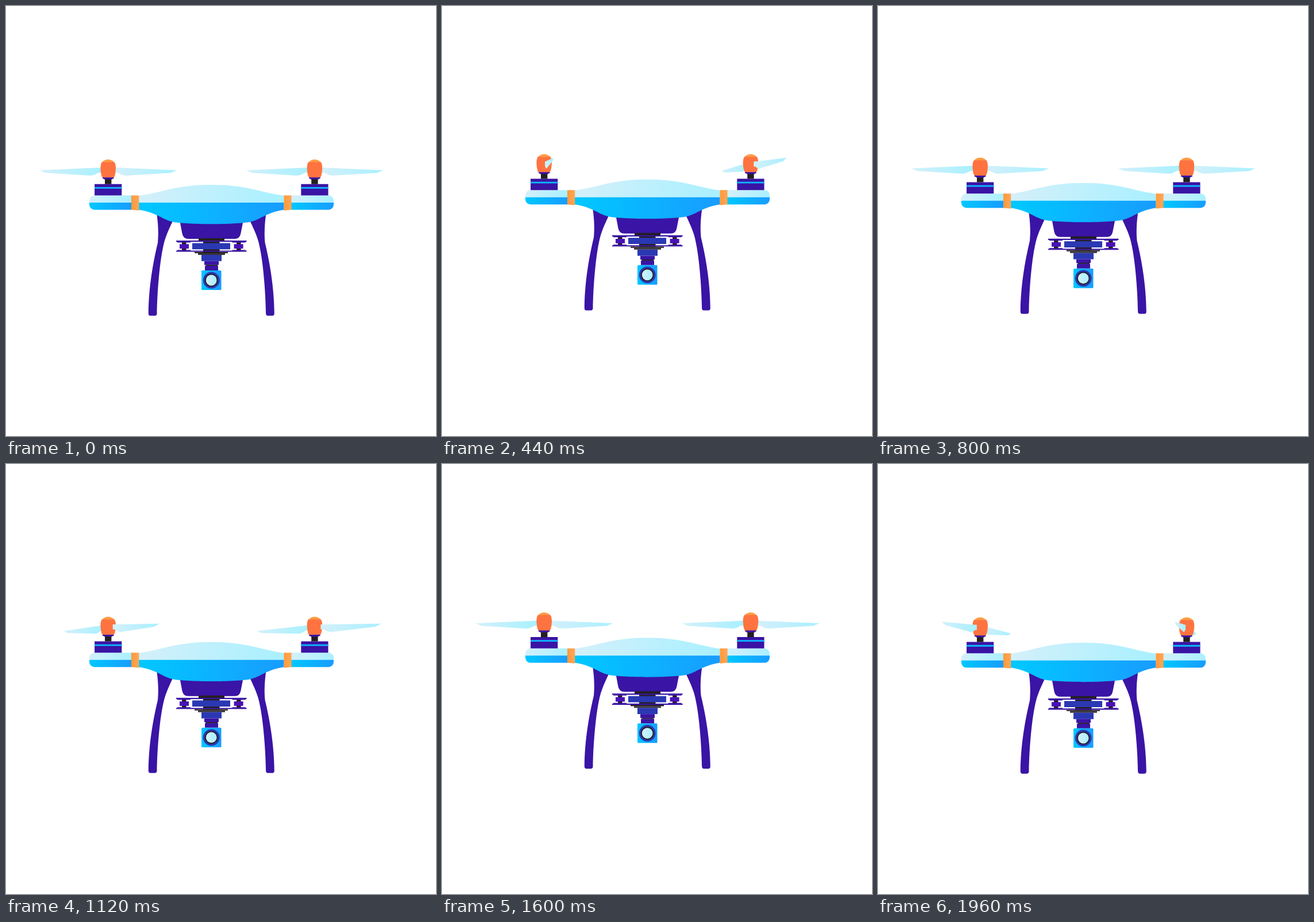
An HTML page with a canvas for the animation above (2 s loop, 748 px wide and 748 px high).

```html
<!DOCTYPE html>
<html lang="en">
<head>
<meta charset="utf-8">
<title>Drone</title>
<style>
html, body { margin: 0; width: 100%; height: 100%; overflow: hidden; background: #fff; }
canvas { display: block; width: 748px; height: 748px; }
</style>
</head>
<body>
<canvas id="stage" width="748" height="748"></canvas>
<script>
const ctx = document.getElementById('stage').getContext('2d');

const LOOP = 2000, STEP = 40;
const MID = 357.3;           // mirror axis of the drone
const EYE = 374, DEPTH = 990; // vanishing point and camera distance
const HUBS = [177.7, 536.9];

const PURPLE = '#3a14a5', BLUE = '#2b38b3', DARK = '#231f20';
const ICE = ['#d3f0fa', '#a9f0ff'];
const SKY = ['#00c8ff', '#189cff'];
const ORANGE = ['#ff9a3c', '#ffa655'];

function grad(x0, x1, [a, b]) {
  const g = ctx.createLinearGradient(x0, 0, x1, 0);
  g.addColorStop(0, a);
  g.addColorStop(1, b);
  return g;
}

function rect(x0, y0, x1, y1, fill, radius = 0) {
  ctx.fillStyle = fill;
  ctx.beginPath();
  ctx.roundRect(x0, y0, x1 - x0, y1 - y0, radius);
  ctx.fill();
}

function shape(d, fill) {
  ctx.fillStyle = fill;
  ctx.fill(new Path2D(d));
}

function disc(x, y, r, fill) {
  ctx.fillStyle = fill;
  ctx.beginPath();
  ctx.arc(x, y, r, 0, Math.PI * 2);
  ctx.fill();
}

// Draws the same thing on both sides of the axis
function mirrored(draw) {
  draw();
  ctx.save();
  ctx.translate(MID * 2, 0);
  ctx.scale(-1, 1);
  draw();
  ctx.restore();
}

function leg() {
  shape('M262 360C265 380 265.5 398 264 412C256 445 248 490 247.8 535' +
    'Q248 538.8 251 538.8H259Q262.3 538.8 262.5 535' +
    'C263 500 267 440 276 408C280 395 285 385 291 372Z', PURPLE);
}

function roller() {
  rect(306, 410, 313.5, 426, DARK);
  rect(302, 414.3, 318, 422, '#4a10b8');
  rect(298, 410, 321, 411.5, PURPLE);
  rect(298, 424.3, 321, 425.8, PURPLE);
}

function gimbal() {
  rect(335, 404, 380, 409, DARK);
  rect(343, 409, 371.5, 428, DARK);
  mirrored(roller);
  rect(296, 408, 418.5, 410.2, PURPLE);
  rect(296, 425.5, 418.5, 427.6, PURPLE);
  rect(324, 412.5, 390, 423.2, BLUE);
  rect(328, 427.8, 386, 430, DARK);
  rect(334, 430, 381, 433, '#38363c');
  rect(340, 433, 375, 443.8, BLUE);
  rect(345, 443.8, 370, 450.5, PURPLE);
  rect(347.5, 450.3, 368, 452.2, DARK);
  rect(346, 452, 369, 460, PURPLE);
  rect(340, 460, 374.5, 494, grad(340, 374, SKY), 1.5);
  disc(357.2, 477, 14.5, BLUE);
  disc(357.2, 477, 11.2, DARK);
  disc(357.2, 477, 9.4, grad(348, 367, ICE));
}

function arm(x0, x1, left) {
  const r = 9;
  rect(x0, 329.5, x1, 342.2, grad(x0, x1, ICE), left ? [r, 0, 0, 0] : [0, r, 0, 0]);
  rect(x0, 342, x1, 354.5, grad(x0, x1, SKY), left ? [0, 0, 0, r] : [0, 0, r, 0]);
}

function body() {
  arm(145, 219, true);
  arm(496, 570, false);
  shape('M231 330C275 324 295 311 357.3 311C419 311 440 324 483.6 330V342.2H231Z',
    grad(231, 484, ICE));
  shape('M231 342H483.6V354.5C450 360 445 371 425 375.5C400 380.6 315 380.6 290 375.5' +
    'C270 371 265 360 231 354.5Z', grad(231, 484, SKY));
  shape('M218 329.5H231.3V355.8L218 354.5Z', grad(218, 231, ORANGE));
  shape('M483.4 329.5H496.6V354.5L483.4 355.8Z', grad(483, 496, ORANGE));
}

function motor(x) {
  rect(x - 23.6, 309.7, x + 23.6, 329.5, PURPLE);
  rect(x - 23.6, 315, x + 23.6, 317.8, '#0cb8ff');
  rect(x - 5.7, 300, x + 5.7, 309.8, DARK);
  rect(x - 7.5, 299, x + 7.5, 301.5, PURPLE);
  rect(x - 9.7, 297.5, x + 9.7, 300.3, PURPLE);
}

function hub(x) {
  ctx.save();
  ctx.translate(x, 0);
  shape('M-10.8 272Q-6.5 267 0 267Q6.5 267 10.8 272Z', '#ff9d45');
  shape('M-10.8 271.5H10.8Q13.4 275 13.3 283Q13 291 11.3 296Q10.5 298.3 8 298.3' +
    'H-8Q-10.5 298.3 -11.3 296Q-13 291 -13.3 283Q-13.4 275 -10.8 271.5Z', '#ff7340');
  ctx.restore();
}

// One blade turning about the vertical axis, seen in perspective
function blade(x, angle, bob) {
  const c = Math.cos(angle), s = Math.sin(angle);
  const at = (r, y) => {
    const k = DEPTH / (DEPTH - r * s);
    return [EYE + (x + r * c - EYE) * k, EYE + (y + bob - EYE) * k - bob];
  };
  const root = at(11.5, 281), tip = at(119.2, 285.8);
  ctx.beginPath();
  ctx.moveTo(...root);
  ctx.lineTo(...at(22, 281.6));
  ctx.lineTo(...tip);
  ctx.lineTo(...at(109, 290.2));
  ctx.lineTo(...at(31, 295));
  ctx.quadraticCurveTo(...at(24, 294.5), ...at(18, 290.5));
  ctx.lineTo(...at(11.5, 289.5));
  ctx.closePath();
  ctx.fillStyle = grad(Math.min(root[0], tip[0]), Math.max(root[0], tip[0]), ICE);
  ctx.fill();
}

function rotor(x, angle, bob) {
  const pair = [angle, angle + Math.PI];
  const near = a => Math.sin(a) > 0.01;
  motor(x);
  pair.filter(a => !near(a)).forEach(a => blade(x, a, bob));
  hub(x);
  pair.filter(near).forEach(a => blade(x, a, bob));
}

function draw(ms) {
  const t = Math.floor((ms % LOOP) / STEP) * STEP;
  const bob = -4.8 * (1 - Math.cos(t / 1000 * Math.PI * 2));
  const angle = (t * 1.8 % 360) * Math.PI / 180;
  ctx.fillStyle = '#fff';
  ctx.fillRect(0, 0, 748, 748);
  ctx.save();
  ctx.translate(0, bob);
  mirrored(leg);
  shape('M302 372H413L408.3 396Q406.5 405 398 405H317Q308.500 405 306.500 396Z', PURPLE);
  gimbal();
  body();
  HUBS.forEach(x => rotor(x, angle, bob));
  ctx.restore();
}

const start = performance.now();
function tick() {
  draw(performance.now() - start);
  requestAnimationFrame(tick);
}
tick();
</script>
</body>
</html>
```
